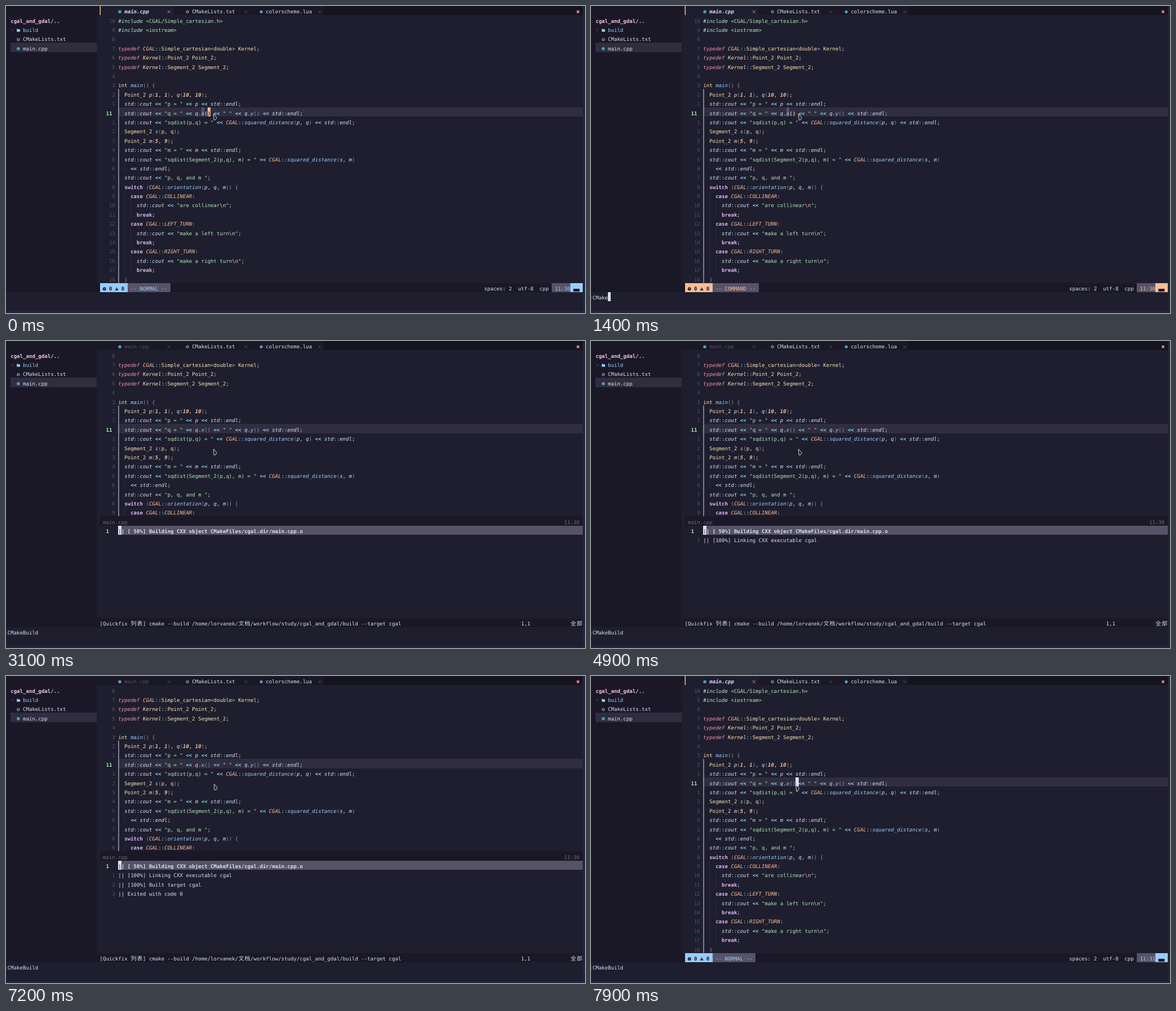
These frames come from a looping animation (1028x545 px, 8000 ms). An HTML page with a canvas:

```html
<!DOCTYPE html>
<html lang="en">
<head>
<meta charset="utf-8">
<title>Editor build</title>
<style>
html, body { margin: 0; width: 100%; height: 100%; overflow: hidden; background: #1e1e2e; }
canvas { display: block; }
</style>
</head>
<body>
<canvas id="stage" width="1028" height="545"></canvas>
<script>
const ctx = document.getElementById('stage').getContext('2d');
const LOOP = 8000, CELL = 5.46, ROW = 16.39, LEFT = -2.73, TOP = -0.2;
const CODE = 37, MAIN = 31, COLS = 188;
const C = {
  bg: '#1e1e2e', dark: '#1a1826', fill: '#161320', line: '#302d41', mid: '#575268',
  gray: '#6e6c7e', bracket: '#988ba2', white: '#d9e0ee', pink: '#f5c2e7', mauve: '#ddb6f2',
  red: '#f28fad', peach: '#f8bd96', yellow: '#fae3b0', green: '#abe9b3', sky: '#89dceb',
  blue: '#96cdfb', teal: '#b5e8e0', cpp: '#519aba', gear: '#7d8a96', lua: '#51a0cf', desk: '#20263a'
};

const source = String.raw`#include <CGAL/Simple_cartesian.h>
#include <iostream>

typedef CGAL::Simple_cartesian<double> Kernel;
typedef Kernel::Point_2 Point_2;
typedef Kernel::Segment_2 Segment_2;

int main() {
  Point_2 p(1, 1), q(10, 10);
  std::cout << "p = " << p << std::endl;
  std::cout << "q = " << q.x() << " " << q.y() << std::endl;
  std::cout << "sqdist(p,q) = " << CGAL::squared_distance(p, q) << std::endl;
  Segment_2 s(p, q);
  Point_2 m(5, 9);
  std::cout << "m = " << m << std::endl;
  std::cout << "sqdist(Segment_2(p,q), m) = " << CGAL::squared_distance(s, m)
    << std::endl;
  std::cout << "p, q, and m ";
  switch (CGAL::orientation(p, q, m)) {
    case CGAL::COLLINEAR:
      std::cout << "are collinear\n";
      break;
    case CGAL::LEFT_TURN:
      std::cout << "make a left turn\n";
      break;
    case CGAL::RIGHT_TURN:
      std::cout << "make a right turn\n";
      break;
  }`.split('\n');

// Highlight rules, tried in order: pattern, colour, font style
const rules = [
  [/#include/y, C.teal, 'italic'],
  [/<[\w\/.]+>$/y, C.green, ''],
  [/\\n/y, C.pink, ''],
  [/"[^"\\]*"?/y, C.green, ''],
  [/typedef/y, C.red, 'italic'],
  [/(switch|case|break)\b/y, C.mauve, 'bold'],
  [/Kernel(?=::)/y, C.yellow, 'italic'],
  [/(int|double|Simple_cartesian|Kernel|Point_2|Segment_2)\b/y, C.yellow, ''],
  [/(p(?=, q\);$)|q(?=\);$))/y, C.yellow, ''],
  [/[A-Z_]{4,}/y, C.peach, 'italic'],
  [/(\w{2,}|[xys])(?=\()/y, C.blue, 'italic'],
  [/\d+/y, C.peach, 'italic bold'],
  [/\w+/y, C.white, 'italic'],
  [/<</y, C.sky, 'bold'],
  [/[:<>.]+/y, C.sky, ''],
  [/[(){}]/y, C.bracket, ''],
  [/./y, C.white, '']
];

function tokenize(text) {
  const out = [];
  let at = 0;
  while (at < text.length) {
    for (const [re, color, style] of rules) {
      re.lastIndex = at;
      const hit = re.exec(text);
      if (!hit) continue;
      out.push({ at, text: hit[0], color, style });
      at += hit[0].length;
      break;
    }
  }
  return out;
}
const lines = source.map(text => ({
  indent: text.search(/\S/),
  tokens: tokenize(text)
}));

const colX = c => LEFT + c * CELL;
const rowY = r => TOP + r * ROW;

function box(c0, c1, r0, r1, color) {
  const x = Math.round(colX(c0)), y = Math.round(rowY(r0));
  ctx.fillStyle = color;
  ctx.fillRect(x, y, Math.round(colX(c1)) - x, Math.round(rowY(r1)) - y);
}

function write(text, col, row, color, style = '') {
  const y = rowY(row) + 13.5;
  const font = `${style} 9.07px "DejaVu Sans Mono", monospace`;
  ctx.fillStyle = color;
  for (const ch of text) {
    if (ch > '\u2e80') {
      ctx.font = '10px "Noto Sans CJK SC", "Noto Sans CJK", sans-serif';
      ctx.fillText(ch, colX(col) + 0.4, y + 0.2);
      col += 2;
    } else {
      if (ch !== ' ') {
        ctx.font = font;
        ctx.fillText(ch, colX(col), y);
      }
      col++;
    }
  }
}

function dot(x, y, r, color) {
  ctx.fillStyle = color;
  ctx.beginPath();
  ctx.arc(x, y, r, 0, 7);
  ctx.fill();
}

function path(points, color, width, close) {
  ctx.beginPath();
  points.forEach(([x, y]) => ctx.lineTo(x, y));
  if (close) ctx.closePath();
  if (width) {
    ctx.strokeStyle = color;
    ctx.lineWidth = width;
    ctx.stroke();
  } else {
    ctx.fillStyle = color;
    ctx.fill();
  }
}

function cross(x, y, r, color, width) {
  path([[x - r, y - r], [x + r, y + r]], color, width);
  path([[x - r, y + r], [x + r, y - r]], color, width);
}

const midX = col => colX(col) + CELL / 2;
const midY = row => rowY(row) + 10.5;

function gear(col, row) {
  const x = midX(col), y = midY(row);
  ctx.strokeStyle = C.gear;
  ctx.lineWidth = 1.4;
  ctx.beginPath();
  ctx.arc(x, y, 1.8, 0, 7);
  ctx.stroke();
  for (let i = 0; i < 8; i++) {
    const a = i * Math.PI / 4;
    dot(x + 2.5 * Math.cos(a), y + 2.5 * Math.sin(a), 0.5, C.gear);
  }
}

function sidebar() {
  box(0, 30, 0, 31, C.dark);
  box(30, MAIN, 0, 1, C.dark);
  box(30, MAIN, 30, 31, C.dark);
  box(2, 30, 4, 5, C.line);
  write('cgal_and_gdal/..', 2, 1, C.pink, 'bold');
  const y = midY(2);
  path([[10.3, y - 1.8], [12, y], [10.3, y + 1.8]], C.gray, 0.9);
  ctx.fillStyle = C.blue;
  ctx.fillRect(19.2, y - 2.4, 2.6, 2);
  ctx.fillRect(19.2, y - 1.6, 5.8, 4.2);
  write('build', 6, 2, C.blue);
  gear(4, 3);
  write('CMakeLists.txt', 6, 3, C.white);
  dot(midX(4), midY(4), 2.8, C.cpp);
  write('main.cpp', 6, 4, C.white);
}

function tabs(active) {
  box(MAIN, COLS, 0, 1, C.fill);
  box(MAIN, 104, 0, 1, C.dark);
  if (active) {
    box(MAIN, 55, 0, 1, C.bg);
    ctx.fillStyle = C.peach;
    ctx.fillRect(166.5, 0, 1.5, 16);
  }
  dot(midX(37), midY(0), 2.8, C.cpp);
  write('main.cpp', 39, 0, active ? C.white : C.mid, active ? 'italic bold' : '');
  cross(midX(53), midY(0), 2.6, active ? C.red : C.mid, 0.9);
  gear(59, 0);
  write('CMakeLists.txt', 61, 0, C.white);
  cross(midX(78), midY(0), 2.6, C.mid, 0.9);
  dot(midX(83), midY(0), 2.6, C.lua);
  write('colorscheme.lua', 85, 0, C.white);
  cross(midX(102), midY(0), 2.6, C.mid, 0.9);
  cross(midX(186), midY(0), 2.1, C.red, 1.7);
}

function guide(indent, row, color) {
  ctx.fillStyle = color;
  ctx.fillRect(colX(CODE + indent) + 0.2, rowY(row), 1, ROW);
}

function code(first, last) {
  const here = 10;
  for (let i = first; i < lines.length; i++) {
    const row = i - first + 1;
    if (row > last) break;
    const { indent, tokens } = lines[i];
    if (i === here) {
      box(CODE, COLS, row, row + 1, C.line);
      write('11', 33, row, C.green, 'bold');
    } else {
      const n = String(Math.abs(i - here));
      write(n, 36 - n.length, row, C.mid);
    }
    for (let g = 2; g < indent; g += 2) guide(g, row, C.line);
    if (i > 7) guide(0, row, C.white);
    for (const t of tokens) write(t.text, CODE + t.at, row, t.color, t.style);
  }
}

function matchMarks(cursor) {
  box(64, 65, 11, 12, C.mid);
  write('x', 64, 11, C.blue, 'italic');
  box(65, 67, 11, 12, C.line);
  write('(', 65, 11, C.peach, 'bold');
  if (cursor) box(66, 67, 11, 12, C.peach);
  write(')', 66, 11, cursor ? C.bg : C.peach, 'bold');
}

function modeLine(mode, accent, pos) {
  const end = 40 + mode.length + 8;
  box(MAIN, COLS, 30, 31, C.dark);
  box(MAIN, 40, 30, 31, accent);
  box(40, end, 30, 31, C.mid);
  const y = midY(30) + 0.2;
  dot(midX(32), y, 2.9, C.dark);
  cross(midX(32), y, 0.9, accent, 0.9);
  write('0', 34, 30, C.dark, 'bold');
  const x = midX(36);
  path([[x, y - 3], [x + 3.1, y + 2.6], [x - 3.1, y + 2.6]], C.dark, 0, true);
  ctx.fillStyle = accent;
  ctx.fillRect(x - 0.4, y - 1, 0.8, 2);
  write('0', 38, 30, C.dark, 'bold');
  write(`-- ${mode} --`, 41, 30, accent);
  write('spaces: 2', 156, 30, C.white);
  write('utf-8', 167, 30, C.white);
  write('cpp', 174, 30, C.white);
  box(178, 184, 30, 31, C.mid);
  write(pos, 179, 30, accent);
  box(184, COLS, 30, 31, accent);
  ctx.fillStyle = C.dark;
  ctx.fillRect(colX(185), 502, CELL * 2, 5);
}

const output = [
  [3100, '|| [ 50%] Building CXX object CMakeFiles/cgal.dir/main.cpp.o'],
  [4900, '|| [100%] Linking CXX executable cgal'],
  [5000, '|| [100%] Built target cgal'],
  [5000, '|| Exited with code 0']
];

function quickfix(t) {
  box(MAIN, COLS, 19, 20, C.dark);
  write('main.cpp', 32, 19, C.gray);
  write('11:30', 182, 19, C.gray);
  box(CODE, COLS, 20, 21, C.mid);
  output.forEach(([start, text], i) => {
    if (t < start) return;
    if (i) write(String(i), 35, 20 + i, C.mid);
    else write('1', 33, 20, C.green, 'bold');
    write(text, CODE, 20 + i, C.white, i ? '' : 'bold');
  });
  box(CODE, CODE + 1, 20, 21, C.white);
  write('|', CODE, 20, C.mid, 'bold');
  box(MAIN, COLS, 30, 31, C.dark);
  write('[Quickfix 列表] cmake --build /home/lorvanek/文档/workflow/study/cgal_and_gdal/build --target cgal', MAIN, 30, C.white);
  write('1,1', 168, 30, C.white);
  write('全部', 184, 30, C.white);
}

// Time and number of typed letters
const typing = [[500, 0], [700, 1], [900, 2], [1100, 3], [1200, 4], [1400, 5],
  [1700, 6], [1900, 7], [2100, 8], [2300, 10]];
// Time and pointer offset
const moves = [[0, 0, 0], [7200, 1, 0], [7500, 0.5, 0], [7600, 0, 0],
  [7700, -1, 0], [7800, -2, -0.3], [7900, -4.5, 1.3]];
const latest = (list, t) => list.filter(step => step[0] <= t).pop();

function commandLine(t) {
  const step = latest(typing, t);
  if (!step) return;
  const text = ':' + 'CMakeBuild'.slice(0, step[1]);
  write(text, 0, 31, C.white);
  if (t < 3100) box(text.length, text.length + 1, 31, 32, C.white);
}

function pointer(t) {
  const [, dx, dy] = latest(moves, t);
  const shape = [[368.6, 191.8], [374.3, 198.2], [371.9, 202.2], [369, 202.2]]
    .map(([x, y]) => [x + dx, y + dy]);
  path(shape, C.bg, 0, true);
  path(shape, '#d8d3cd', 1, true);
}

function draw(t) {
  const building = t >= 3100 && t < 7900;
  const command = t >= 500 && t < 3100;
  ctx.fillStyle = C.bg;
  ctx.fillRect(0, 0, 1028, 545);
  sidebar();
  tabs(!building);
  if (building) {
    code(2, 18);
    quickfix(t);
  } else {
    code(0, 29);
    if (t < 3100) matchMarks(!command);
    else box(67, 68, 11, 12, C.white);
    modeLine(command ? 'COMMAND' : 'NORMAL', command ? C.peach : C.blue, t < 3100 ? '11:30' : '11:31');
  }
  commandLine(t);
  pointer(t);
  ctx.fillStyle = C.desk;
  ctx.fillRect(1024, 0, 4, 545);
  ctx.fillRect(0, 541, 1028, 4);
}

ctx.textRendering = 'geometricPrecision';
const begin = performance.now();
function tick() {
  draw((performance.now() - begin) % LOOP);
  requestAnimationFrame(tick);
}
tick();
</script>
</body>
</html>
```
